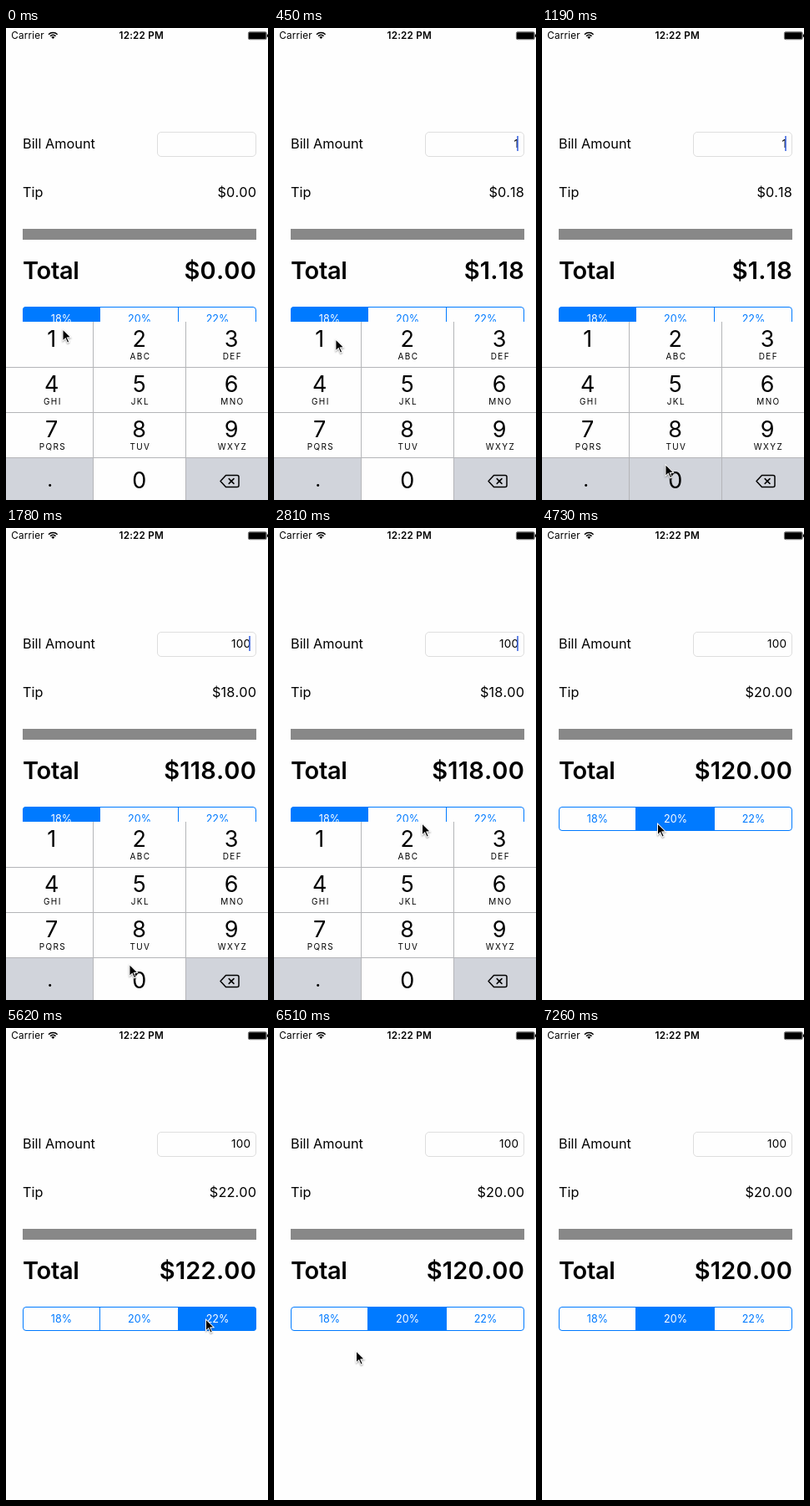
Write an HTML page with a canvas that moves like this. It is 314 by 564 pixels and loops after 7570 ms.

```html
<!DOCTYPE html>
<html lang="en">
<head>
<meta charset="utf-8">
<title>Tip calculator</title>
<style>
  html, body { margin: 0; width: 100%; height: 100%; overflow: hidden; background: #fefefe; }
  canvas { display: block; width: 314px; height: 564px; }
</style>
</head>
<body>
<canvas id="stage"></canvas>
<script>
const W = 314, H = 564, LOOP = 7570, TICK = 148;
const WHITE = '#fefefe', BLACK = '#000', BLUE = '#007aff', GREY = '#d1d4db', LINE = '#b4b5b8';
const FONT = 'Inter, Roboto, "Liberation Sans", sans-serif';

const canvas = document.getElementById('stage');
const ctx = canvas.getContext('2d');
const dpr = window.devicePixelRatio || 1;
canvas.width = W * dpr;
canvas.height = H * dpr;

// Pointer waypoints: tick, x, y
const PATH = [
  [0, 67.5, 359], [2, 67.5, 359], [8, 147.5, 520.5], [12, 147.5, 520.5], [16, 60, 385],
  [19, 177, 352], [22, 154, 188.5], [26, 154, 188.5], [30, 136, 357], [32, 138, 352],
  [34, 150, 351], [37, 239, 347], [39, 239, 347], [42, 120, 351], [43, 116, 353],
  [44, 98, 385], [47, 218, 552]
];
const POINTER_END = 49;

// Value in force at a tick, from [first tick, value] pairs
const at = (steps, k) => steps.filter(s => s[0] <= k).pop()[1];
const AMOUNTS = [[0, ''], [2, '1'], [9, '10'], [12, '100']];
const RATES = [[0, 18], [31, 20], [37, 22], [43, 20]];
const PRESSED = [[0, ''], [1, '1'], [2, ''], [8, '0'], [9, ''], [11, '0'], [12, '']];
const CARET = [[0, false], [2, true], [6, false], [8, true], [16, false], [18, true], [22, false]];

function text(str, x, y, size, opt = {}) {
  ctx.font = `${opt.weight || 400} ${size}px ${FONT}`;
  ctx.letterSpacing = (opt.space || 0) + 'px';
  ctx.fontKerning = opt.kerning || 'auto';
  ctx.textAlign = opt.align || 'left';
  ctx.fillStyle = opt.color || BLACK;
  ctx.fillText(str, x, y);
}

function rect(x, y, w, h, color) {
  ctx.fillStyle = color;
  ctx.fillRect(x, y, w, h);
}

function roundPath(x, y, w, h, r) {
  ctx.beginPath();
  ctx.roundRect(x, y, w, h, r);
}

function poly(points) {
  ctx.beginPath();
  points.forEach(([x, y]) => ctx.lineTo(x, y));
  ctx.closePath();
}

function statusBar() {
  text('Carrier', 6.3, 13.2, 11.7, { space: 0.2 });
  text('12:22 PM', 162.2, 13.2, 11.7, { weight: 600, align: 'center', space: 0.2 });
  const a = -Math.PI * 0.75, b = -Math.PI * 0.25;
  ctx.strokeStyle = ctx.fillStyle = BLACK;
  ctx.lineWidth = 1.6;
  for (const r of [4.6, 7.5]) {
    ctx.beginPath();
    ctx.arc(56.3, 13, r, a, b);
    ctx.stroke();
  }
  ctx.beginPath();
  ctx.moveTo(56.3, 13);
  ctx.arc(56.3, 13, 2.8, a, b);
  ctx.fill();

  ctx.lineWidth = 0.6;
  roundPath(290.4, 4.7, 21.8, 9, 1.6);
  ctx.stroke();
  roundPath(291, 5.3, 20.6, 7.8, 0.8);
  ctx.fill();
  rect(312.8, 7.6, 1.2, 3.2, BLACK);
}

function form(k) {
  const amount = at(AMOUNTS, k), rate = at(RATES, k);
  const tip = amount * rate / 100;
  const money = v => '$' + v.toFixed(2);
  const figures = { align: 'right', kerning: 'none', space: 0.1 };

  text('Bill Amount', 20, 144.2, 16.3);
  roundPath(181.5, 124.5, 118, 29, 4.5);
  ctx.strokeStyle = '#dedede';
  ctx.lineWidth = 1;
  ctx.stroke();
  text(amount, 293.2, 143.4, 13.6, { ...figures, space: 0.2 });
  if (at(CARET, k)) rect(291.2, 129, 1.6, 18, '#4068e0');

  text('Tip', 20, 202.1, 16.3);
  text(money(tip), 300, 202.1, 16.3, figures);
  rect(20, 240, 280, 13, '#888');
  text('Total', 20, 300, 29, { weight: 600, space: -0.3 });
  text(money(+amount + tip), 300, 300, 29, { ...figures, weight: 600, space: 0.2 });
  segments(rate);
}

function segments(rate) {
  const edges = [20, 112.5, 206.5, 300];
  ctx.save();
  roundPath(20, 333, 280, 29, 4);
  ctx.clip();
  [18, 20, 22].forEach((r, i) => {
    const x = edges[i], w = edges[i + 1] - x, on = r === rate;
    if (on) rect(x - 0.5, 333, w + 1, 29, BLUE);
    if (i) rect(x - 0.5, 333, 1, 29, BLUE);
    text(r + '%', [66.5, 160, 253.5][i], 352.1, 12.6,
      { align: 'center', color: on ? WHITE : BLUE });
  });
  ctx.restore();
  roundPath(20.5, 333.5, 279, 28, 3.5);
  ctx.strokeStyle = BLUE;
  ctx.lineWidth = 1;
  ctx.stroke();
}

function keyboard(k, t) {
  const u = Math.min(1, Math.max(0, (t - 3255) / 550));
  if (u === 1) return;
  const cols = [0, 104.5, 215.5, W];
  const mids = [54.7, 159.7, 270.2];
  const letters = ['', 'ABC', 'DEF', 'GHI', 'JKL', 'MNO', 'PQRS', 'TUV', 'WXYZ'];
  const pressed = at(PRESSED, k);

  ctx.save();
  ctx.translate(0, 351 + 213 * (1 - (1 - u) ** 4));
  rect(0, 0, W, 213, WHITE);
  for (let i = 0; i < 12; i++) {
    const c = i % 3, y = Math.floor(i / 3) * 54;
    const label = i < 9 ? String(i + 1) : ['.', '0', ''][c];
    const grey = i === 9 || i === 11 || label === pressed;
    if (grey) rect(cols[c], y, cols[c + 1] - cols[c], 54, GREY);
    if (i < 9) {
      text(label, mids[c], y + 29.6, 27, { align: 'center' });
      text(letters[i], mids[c] + 1.2, y + 44.8, 10, { align: 'center', space: 1.4 });
    } else if (label === '0') {
      text(label, mids[c], y + 37.1, 27, { align: 'center' });
    }
  }
  text('.', 52.6, 196.8, 24, { align: 'center' });
  for (const y of [54, 108, 162]) rect(0, y, W, 1, LINE);
  for (const x of [104, 215]) rect(x, 0, 1, 213, LINE);
  deleteIcon(257, 183);
  ctx.restore();
}

function deleteIcon(x, y) {
  ctx.save();
  ctx.translate(x, y);
  ctx.strokeStyle = BLACK;
  ctx.lineWidth = 1.5;
  ctx.lineJoin = ctx.lineCap = 'round';
  ctx.beginPath();
  ctx.moveTo(0, 7.5);
  ctx.lineTo(6.5, 0.5);
  ctx.lineTo(20, 0.5);
  ctx.quadraticCurveTo(22, 0.5, 22, 2.5);
  ctx.lineTo(22, 12.5);
  ctx.quadraticCurveTo(22, 14.5, 20, 14.5);
  ctx.lineTo(6.5, 14.5);
  ctx.closePath();
  ctx.moveTo(10.2, 4.6);
  ctx.lineTo(16, 10.4);
  ctx.moveTo(16, 4.6);
  ctx.lineTo(10.2, 10.4);
  ctx.stroke();
  ctx.restore();
}

function pointer(k) {
  if (k >= POINTER_END) return;
  const n = PATH.findIndex(p => p[0] > k);
  const to = n < 0 ? PATH[PATH.length - 1] : PATH[n];
  const from = n < 0 ? to : PATH[n - 1];
  const u = n < 0 ? 0 : (k - from[0]) / (to[0] - from[0]);
  const e = u * u * (3 - 2 * u);

  ctx.save();
  ctx.translate(from[1] + (to[1] - from[1]) * e, from[2] + (to[2] - from[2]) * e);
  poly([[0, 0], [0, 16], [3.6, 12.6], [6, 18], [8.8, 16.8], [6.5, 11.5], [11.3, 11.3]]);
  ctx.shadowColor = 'rgba(0,0,0,0.4)';
  ctx.shadowBlur = 2 * dpr;
  ctx.shadowOffsetY = dpr;
  ctx.fillStyle = '#fff';
  ctx.fill();
  ctx.shadowColor = 'transparent';
  poly([[1, 2.2], [1, 13.7], [3.9, 10.9], [6.4, 16.6], [7.6, 16.1], [5.1, 10.5], [9.1, 10.3]]);
  ctx.fillStyle = BLACK;
  ctx.fill();
  ctx.restore();
}

function draw(now) {
  const time = now % LOOP;
  const k = Math.floor((time + 12) / TICK);
  ctx.setTransform(dpr, 0, 0, dpr, 0, 0);
  rect(0, 0, W, H, WHITE);
  statusBar();
  form(k);
  keyboard(k, k * TICK);
  pointer(k);
}

let start;
function loop(now) {
  if (start === undefined) start = now;
  draw(now - start);
  requestAnimationFrame(loop);
}
draw(0);
requestAnimationFrame(loop);
</script>
</body>
</html>
```
